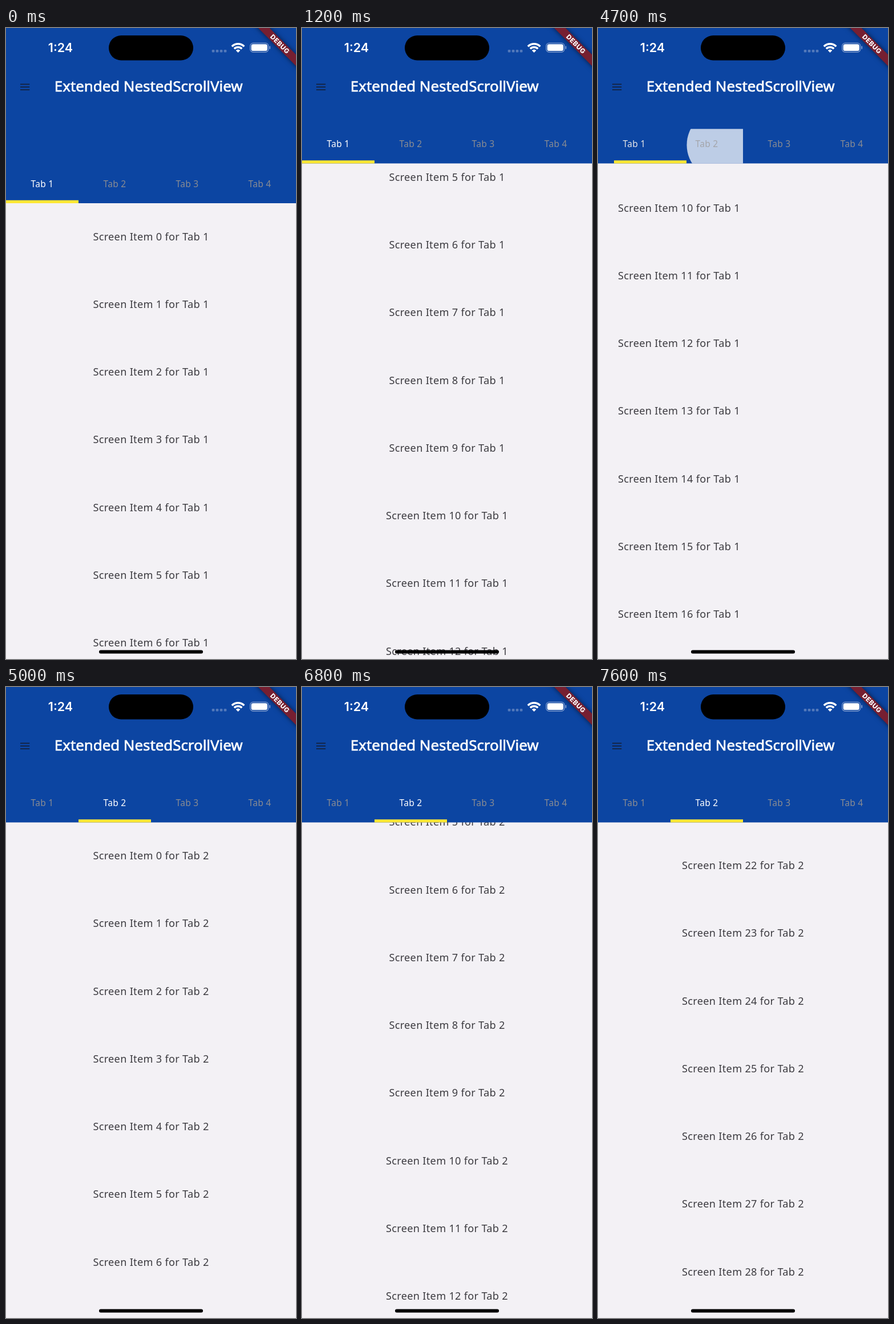
Animation of 508 by 1102 pixels, one loop 8000 ms. Source, as an HTML page with a canvas:

```html
<!DOCTYPE html>
<html lang="en">
<head>
<meta charset="utf-8">
<title>Nested scroll view</title>
<style>
html, body { margin: 0; width: 100%; height: 100%; overflow: hidden; background: #f3f1f5; }
canvas { display: block; }
</style>
</head>
<body>
<canvas id="stage" width="508" height="1102"></canvas>
<script>
const W = 508, H = 1102, LOOP = 8000, STEP = 100;
const TAB_W = W / 4, TAB_H = 60.3, BAR_H = 5.3, ITEM_GAP = 118.25, COLLAPSE = 69.5;
const BLUE = '#0c45a2', SANS = '"Noto Sans", "Open Sans", sans-serif';
const ctx = document.getElementById('stage').getContext('2d');

// Scroll offsets at successive steps, starting at the given time
const scrollA = { start: 400, at: [0, 5, 20, 55, 115, 205, 335, 495, 695, 905, 1080, 1190, 1232.5] };
const scrollB = { start: 6400, at: [0, 40, 170, 380, 650, 960, 1300, 1644, 1965, 2250, 2475, 2577.5, 2584.5] };
const SWITCH = 4650, SWITCH_TIME = 300;

const clamp = (v, lo = 0, hi = 1) => Math.min(hi, Math.max(lo, v));
const mix = (a, b, p) => a + (b - a) * p;

function offset({ start, at }, t) {
  return at[clamp(Math.round((t - start) / STEP), 0, at.length - 1)];
}

// cubic-bezier(.25, .1, .25, 1)
function ease(x) {
  const bez = (a, b, s) => 3 * a * s * (1 - s) ** 2 + 3 * b * s * s * (1 - s) + s ** 3;
  let lo = 0, hi = 1;
  for (let i = 0; i < 24; i++) {
    const mid = (lo + hi) / 2;
    if (bez(.25, .25, mid) < x) lo = mid; else hi = mid;
  }
  return bez(.1, 1, lo);
}

function box(x, y, w, h, color, r = 0) {
  ctx.fillStyle = color;
  ctx.beginPath();
  ctx.roundRect(x, y, w, h, r);
  ctx.fill();
}

function text(str, x, y, font, color, spacing = 0) {
  ctx.font = font;
  ctx.letterSpacing = spacing + 'px';
  ctx.fillStyle = color;
  ctx.textAlign = 'center';
  ctx.fillText(str, x, y);
}

function list(tab, x, scroll) {
  if (Math.abs(x) >= W) return;
  const first = Math.max(0, Math.floor((scroll - 200) / ITEM_GAP));
  for (let i = first; i < first + 11; i++) {
    text(`Screen Item ${i} for Tab ${tab}`, x + W / 2, 370.6 + i * ITEM_GAP - scroll,
      `400 18.1px ${SANS}`, '#3c3b40', .32);
  }
}

function ripple(t, top) {
  const age = t - SWITCH;
  if (age < 0 || age > SWITCH_TIME) return;
  ctx.save();
  ctx.beginPath();
  ctx.rect(TAB_W, top, TAB_W, TAB_H);
  ctx.clip();
  ctx.fillStyle = `rgba(255,255,255,${.73 * clamp(1.2 - age / 270)})`;
  ctx.beginPath();
  ctx.arc(215.5, top + 28, 60 + Math.max(0, age - 50) * .6, 0, 7);
  ctx.fill();
  ctx.restore();
}

function header(t, bottom, page) {
  box(0, 0, W, bottom, BLUE);
  ripple(t, bottom - TAB_H);
  box(page * TAB_W, bottom - BAR_H, TAB_W, BAR_H, '#ffe735');
  for (let i = 0; i < 4; i++) {
    const active = clamp(1 - Math.abs(page - i));
    const [r, g, b] = [138, 140, 146].map(c => Math.round(mix(c, 255, active)));
    text('Tab ' + (i + 1), (i + .5) * TAB_W, bottom - 28.4, `400 15.5px ${SANS}`, `rgb(${r},${g},${b})`, .3);
  }
  ctx.lineWidth = .7;
  ctx.strokeStyle = '#fff';
  text('Extended NestedScrollView', 249.7, 111, `400 25.85px ${SANS}`, '#fff');
  ctx.strokeText('Extended NestedScrollView', 249.7, 111);
  for (let i = 0; i < 3; i++) box(25, 97.4 + i * 4.8, 16.3, 1.7, '#14213d');
}

function wifi() {
  ctx.save();
  ctx.beginPath();
  ctx.moveTo(406.5, 43);
  ctx.lineTo(386.5, 23);
  ctx.lineTo(426.5, 23);
  ctx.clip();
  ctx.strokeStyle = '#fff';
  ctx.lineWidth = 3.5;
  for (const r of [15.2, 9.4]) {
    ctx.beginPath();
    ctx.arc(406.5, 43, r, Math.PI, 0);
    ctx.stroke();
  }
  ctx.fillStyle = '#fff';
  ctx.beginPath();
  ctx.arc(406.5, 43, 5.4, 0, 7);
  ctx.fill();
  ctx.restore();
}

function statusBar() {
  text('1:24', 95.5, 42, '600 21.5px Inter, sans-serif', '#fff');
  box(180, 13, 148, 43.5, '#000', 21.75);
  for (let i = 0; i < 4; i++) box(360.7 + i * 7, 38, 4.6, 4.4, '#5379bb', 1.2);
  wifi();
  ctx.strokeStyle = '#7d9ace';
  ctx.lineWidth = 1.3;
  ctx.beginPath();
  ctx.roundRect(427.7, 26.4, 32, 15.6, 5);
  ctx.stroke();
  box(429.6, 28.3, 28.2, 11.8, '#fff', 3.4);
  box(461.3, 31.6, 1.8, 5.2, '#7d9ace', 1);
}

function ribbon() {
  ctx.save();
  ctx.translate(W, 0);
  ctx.rotate(Math.PI / 4);
  ctx.shadowColor = 'rgba(0,0,0,.6)';
  ctx.shadowBlur = 9;
  box(-60, 32.8, 120, 14, '#761f31');
  ctx.shadowColor = 'transparent';
  text('DEBUG', 0, 43.8, '800 11.5px Inter, sans-serif', '#fff', .5);
  ctx.restore();
}

function draw(t) {
  const a = offset(scrollA, t), b = offset(scrollB, t);
  const page = ease(clamp((t - SWITCH) / SWITCH_TIME));
  box(0, 0, W, H, '#f3f1f5');
  list(1, -page * W, a);
  list(2, (1 - page) * W, COLLAPSE + b);
  header(t, 306 - Math.min(a, COLLAPSE), page);
  statusBar();
  ribbon();
  box(163, 1086.6, 182, 5.8, '#000', 2.9);
}

// The picture advances in tenths of a second
function tick() {
  draw(Math.floor(performance.now() % LOOP / STEP) * STEP);
  requestAnimationFrame(tick);
}
tick();
</script>
</body>
</html>
```
